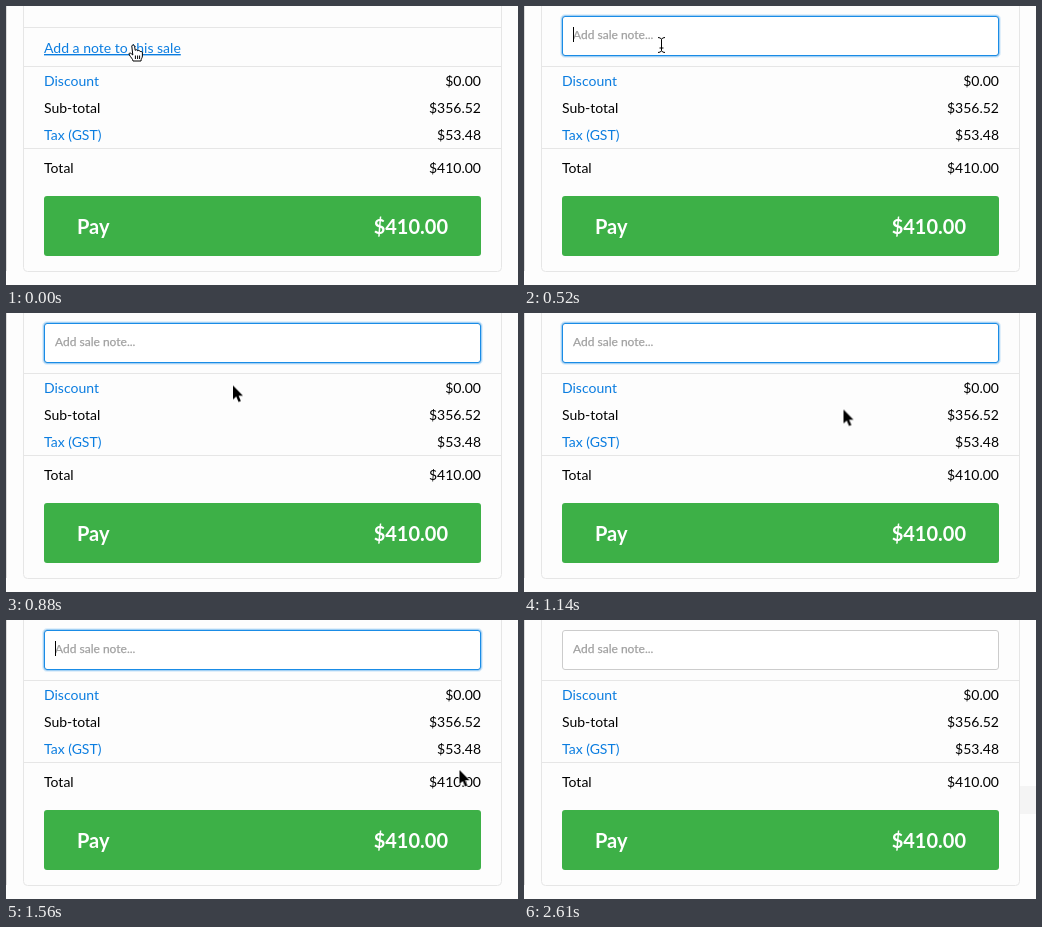
Recreate the animation shown at these times as an HTML page. Size 512 by 279 pixels, loop 2670 ms.

```html
<!DOCTYPE html>
<html lang="en">
<head>
<meta charset="utf-8">
<title>Sale note</title>
<style>
  html, body { margin: 0; width: 100%; height: 100%; overflow: hidden; background: #fdfdfd; }
  svg { display: block; width: 100vw; height: 100vh; font: 14px Lato, sans-serif; }
  .line { stroke: #e6e6e6; fill: none; }
  .link { fill: #0b7de0; }
  .end { text-anchor: end; }
  .pay { font-size: 20px; font-weight: 700; fill: #fff; }
  .hint { font-size: 12px; fill: #a0a0a0; stroke: #a0a0a0; stroke-width: .25px; }
  .hide { opacity: 0; }
</style>
</head>
<body>
<svg viewBox="0 0 512 279">
  <rect width="512" height="279" fill="#fdfdfd"/>
  <path d="M.5 0V265" stroke="#dcdcdc"/>
  <rect id="hover" class="hide" x="496" y="166" width="16" height="28" fill="#f4f4f4"/>
  <path class="line" d="M17.5 -1V261.5a4 4 0 0 0 4 4H491.5a4 4 0 0 0 4 -4V-1M18 60.5H495M18 142.5H495"/>

  <g id="add">
    <path class="line" d="M18 21.5H495"/>
    <text class="link" x="38" y="47" text-decoration="underline">Add a note to this sale</text>
  </g>

  <g id="field" class="hide">
    <rect x="38.5" y="10.5" width="436" height="39" rx="2.5" fill="#fff" stroke="#ccc"/>
    <g id="focus" class="hide" fill="none" stroke="#1a8ce6">
      <rect x="36.5" y="8.5" width="440" height="43" rx="4.5" opacity=".12"/>
      <rect x="37.5" y="9.5" width="438" height="41" rx="3.5" opacity=".4"/>
      <rect x="38.5" y="10.5" width="436" height="39" rx="2.5"/>
    </g>
    <text class="hint" x="49" y="33">Add sale note...</text>
    <path id="caret" class="hide" d="M49.5 21V36" stroke="#000"/>
  </g>

  <text class="link" x="38" y="80">Discount</text>
  <text class="end" x="475" y="80">$0.00</text>
  <text x="38" y="107">Sub-total</text>
  <text class="end" x="475" y="107">$356.52</text>
  <text class="link" x="38" y="134">Tax (GST)</text>
  <text class="end" x="475" y="134">$53.48</text>
  <text x="38" y="167">Total</text>
  <text class="end" x="475" y="167">$410.00</text>

  <rect x="38" y="190" width="437" height="60" rx="3" fill="#3db047"/>
  <text class="pay" x="71" y="228">Pay</text>
  <text class="pay end" x="442" y="228">$410.00</text>

  <g id="pointer">
    <path id="hand" fill="#fff" stroke="#000" stroke-linejoin="round"
      d="M-1.2 1.2C-1.2 -.4 1.4 -.6 1.6 1.2L2.2 5.4C3 4.2 4.6 4.6 4.8 6C5.6 5 7 5.4 7.2 6.6C8.2 6 9.4 6.6 9.4 8V11C9.4 13 8 13.6 8 16H0C-.2 14 -2.2 12.4 -3.6 10C-4.8 8.2 -3 7.4 -1.8 8.6L-.2 10Z M2.4 10.5V14M4.6 10.5V14M6.6 10.5V14"/>
    <g id="beam" class="hide" fill="none">
      <path d="M-3 -7.5Q0 -7.5 .5 -5.5Q1 -7.5 4 -7.5M.5 -5.5V5.5M-3 7.5Q0 7.5 .5 5.5Q1 7.5 4 7.5M-1.5 3H2.5" stroke="#fff" stroke-width="2.4" opacity=".8"/>
      <path d="M-3 -7.5Q0 -7.5 .5 -5.5Q1 -7.5 4 -7.5M.5 -5.5V5.5M-3 7.5Q0 7.5 .5 5.5Q1 7.5 4 7.5M-1.5 3H2.5" stroke="#000"/>
    </g>
    <path id="arrow" class="hide" stroke="#fff" stroke-linejoin="round" paint-order="stroke" stroke-width="1.6"
      d="M0 0V14L3.2 11.1L5.6 16.6L7.9 15.6L5.6 10.2H10Z"/>
  </g>
</svg>
<script>
const LOOP = 2670;
const $ = id => document.getElementById(id);
const run = (id, frames) => $(id).animate(frames, { duration: LOOP, iterations: Infinity });

// Hard opacity changes: [time, value]
function show(id, ...steps) {
  const keys = [...steps, [LOOP, steps.at(-1)[1]]];
  run(id, keys.map(([t, opacity]) => ({ offset: t / LOOP, opacity, easing: 'steps(1, end)' })));
}

// Sampled pointer path: [time, x, y, samples until the next point]
function move(id, points) {
  run(id, points.map(([t, x, y, n]) => ({
    offset: t / LOOP,
    transform: `translate(${x}px, ${y}px)`,
    easing: `steps(${n}, end)`
  })));
}

show('add', [0, 1], [140, 0]);
show('field', [0, 0], [140, 1]);
show('focus', [0, 0], [140, .35], [200, .75], [260, 1], [2610, 0]);
show('caret', [0, 0], [140, 1], [640, 0], [1150, 1], [1650, 0], [2160, 1], [2610, 0]);
show('hover', [0, 0], [1680, 1]);
show('hand', [0, 1], [140, 0]);
show('beam', [0, 0], [140, 1], [658, 0]);
show('arrow', [0, 0], [658, 1], [1710, 0]);

move('pointer', [
  [0, 127, 39, 1],
  [520, 137, 39, 13],
  [880, 227, 72.5, 5],
  [1030, 284, 87, 1],
  [1060, 294, 89.5, 3],
  [1140, 319.5, 96.5, 15],
  [1560, 453.5, 150, 1],
  [1590, 464, 155, 4],
  [1710, 514, 178, 1],
  [LOOP, 514, 178, 1]
]);
</script>
</body>
</html>
```
